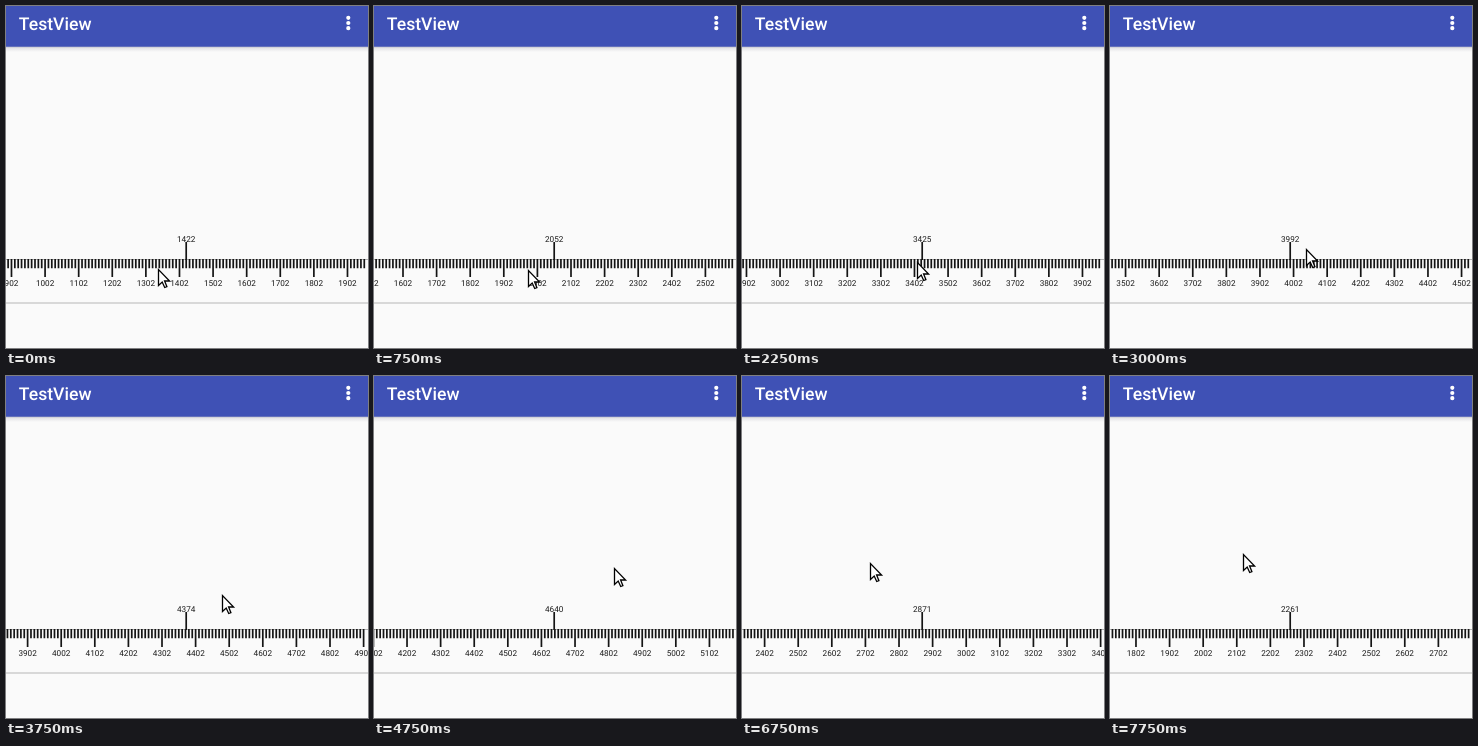
An HTML page for the animation above (8 s loop, 362x342 px).

```html
<!DOCTYPE html>
<html lang="en">
<head>
<meta charset="utf-8">
<title>TestView</title>
<style>
  html, body { margin: 0; width: 100%; height: 100%; overflow: hidden; background: #fafafa; }
  svg { display: block; width: 362px; height: 342px; }
  text { font-family: Roboto, sans-serif; text-rendering: geometricPrecision; }
  .num { font-size: 8.2px; text-anchor: middle; fill: #1c1c1c; }
</style>
</head>
<body>
<svg viewBox="0 0 362 342">
  <defs>
    <linearGradient id="shade" x1="0" y1="0" x2="0" y2="1">
      <stop offset="0" stop-color="#b4b6c2"/>
      <stop offset=".4" stop-color="#e6e6e8"/>
      <stop offset="1" stop-color="#fafafa"/>
    </linearGradient>
  </defs>
  <rect y="40" width="362" height="6" fill="url(#shade)"/>
  <rect width="362" height="40.7" fill="#3f51b5"/>
  <text x="12.8" y="23.7" font-size="17.6" font-weight="500" fill="#fff">TestView</text>
  <path d="M342.3 11.8v.01m0 5.2v.01m0 5.2v.01" stroke="#fff" stroke-width="4.2" stroke-linecap="round"/>
  <path d="M0 253.5H362" stroke="#b4b4b4"/>
  <path d="M0 297H362" stroke="#b8b8b8" stroke-width="1.2"/>
  <path id="ticks" stroke="#141414" stroke-width="1.7"/>
  <g id="labels"></g>
  <path d="M180.2 236V254" stroke="#141414" stroke-width="1.7"/>
  <text id="value" class="num" x="180.2" y="236"></text>
  <path id="cursor" d="M.5 .5V16.5L4.2 13L6.7 18.5L8.9 17.7L6.6 12H11.6Z" fill="#fff" stroke="#000" stroke-width="1.3"/>
</svg>
<script>
const LOOP = 8, STEP = 0.25, SCALE = 0.336, MID = 180.2, EDGE = 359.8;
const $ = id => document.getElementById(id);

// Seconds, ruler value, cursor x, cursor y
const keys = [
  [0, 1422, 152, 263],
  [1.25, 2476, 156, 265],
  [3, 3992, 196, 243],
  [4.75, 4640, 240, 192],
  [5.5, 4177, 252, 191],
  [6.75, 2871, 128, 187],
  [7.5, 2261, 133, 178]
];
const last = keys.length - 1;

function slope(i, col) {
  const a = keys[i], b = keys[i + 1];
  return (b[col] - a[col]) / (b[0] - a[0]);
}

// Harmonic mean of neighbouring slopes keeps the curve from overshooting
function tangent(i, col) {
  const a = slope(Math.max(i - 1, 0), col);
  const b = slope(Math.min(i, last - 1), col);
  return a * b <= 0 ? 0 : 2 * a * b / (a + b);
}

function at(time, col) {
  const t = Math.min(time, keys[last][0]);
  let i = 0;
  while (i < last - 1 && t >= keys[i + 1][0]) i++;
  const a = keys[i], b = keys[i + 1];
  const h = b[0] - a[0], u = (t - a[0]) / h, v = 1 - u;
  const pos = a[col] * (1 + 2 * u) * v * v + b[col] * u * u * (3 - 2 * u)
    + h * u * v * (tangent(i, col) * v - tangent(i + 1, col) * u);
  return Math.round(pos);
}

const label = (x, n) => `<text class="num" x="${x}" y="280">${n}</text>`;

function draw(t) {
  const value = at(t, 1);
  let n = Math.ceil((value - (MID + 5) / SCALE - 2) / 10) * 10 + 2;
  let ticks = "", labels = "";
  for (let x; (x = MID + (n - value) * SCALE) < EDGE; n += 10) {
    const major = n % 100 === 2;
    ticks += `M${x} 253V${major ? 271 : 262.3}`;
    if (major) labels += label(x, n);
  }
  $("ticks").setAttribute("d", ticks);
  $("labels").innerHTML = labels;
  $("value").textContent = value;
  $("cursor").setAttribute("transform", `translate(${at(t, 2)} ${at(t, 3)})`);
}

const start = performance.now();
function frame() {
  const t = (performance.now() - start) / 1000 % LOOP;
  draw(Math.floor(t / STEP) * STEP);
  requestAnimationFrame(frame);
}
frame();
</script>
</body>
</html>
```
